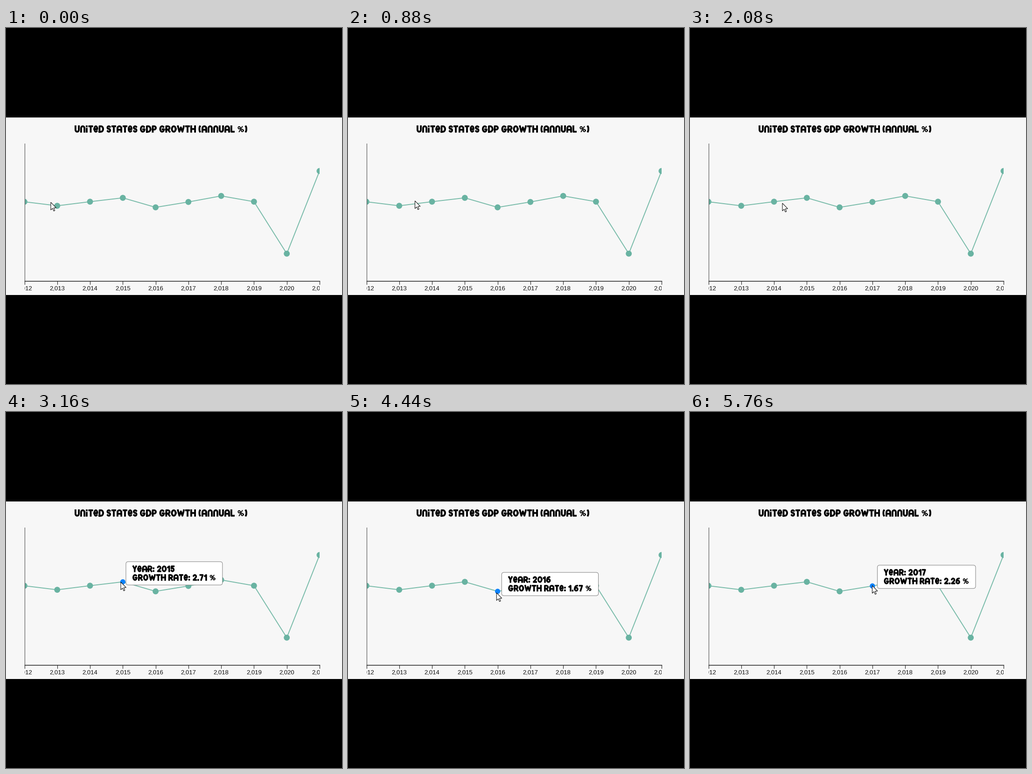
A matplotlib script for the animation above (6.24 s loop, 720x764 px).

```python
import numpy as np
import matplotlib.pyplot as plt
from matplotlib.animation import FuncAnimation
from matplotlib.patches import Circle, FancyBboxPatch, PathPatch, Polygon, Rectangle
from matplotlib.path import Path

W, H, DPI = 720, 764, 100
PX = 72 / DPI
STEP, LOOP = 40, 6240
TEAL, BLUE = "#69b3a2", "#0d82fa"


# ---- Chunky display lettering, built from strokes in a unit box ----
def arc(a0, a1, cx=0.5, cy=0.5, rx=0.5, ry=0.5):
    a = np.radians(np.linspace(a0, a1, 22))
    return list(zip(cx + rx * np.cos(a), cy + ry * np.sin(a)))


def turn(stroke):
    return [(1 - x, 1 - y) for x, y in stroke]


def dot(y):
    return [(0, y), (0, y + 0.02)]


STEM = [(0, 0), (0, 1)]
CUP = [(0, 1)] + arc(180, 360, cy=0.35, ry=0.35) + [(1, 1)]
ARCH = turn(CUP)
BOWL = STEM + arc(90, -90, 0.45, 0.7, 0.55, 0.3) + [(0, 0.4)]
SIX = [(0.85, 1)] + arc(100, 180, 0.6, 0.35, 0.6, 0.62) + arc(180, 540, cy=0.3, ry=0.3)
PAREN = arc(110, 250, cx=1, rx=1)

# character: (advance, strokes)
GLYPHS = {
    "U": (12, [CUP]),
    "N": (12, [ARCH]),
    "I": (5.5, [[(0, 0), (0, 0.55)], dot(0.98)]),
    "T": (11, [[(0, 1), (1, 1)], [(0.5, 0), (0.5, 1)]]),
    "E": (11, [[(0, 0.48), (1, 0.48)] + arc(0, 310)]),
    "D": (12.5, [STEM + arc(90, -90, cx=0.4, rx=0.6) + [(0, 0)]]),
    "S": (10.5, [arc(35, 270, cy=0.76, ry=0.24) + arc(90, -145, cy=0.26, ry=0.26)]),
    "A": (13, [ARCH, [(0, 0.36), (1, 0.36)]]),
    "G": (13, [arc(50, 350) + [(1, 0.45), (0.62, 0.45)]]),
    "P": (11.5, [BOWL]),
    "R": (12, [BOWL, [(0.5, 0.4), (1, 0)]]),
    "O": (13, [arc(0, 360)]),
    "W": (17.5, [[(0, 1), (0.24, 0), (0.5, 0.8), (0.76, 0), (1, 1)]]),
    "H": (13, [STEM, [(1, 0), (1, 1)], [(0, 0.5), (1, 0.5)]]),
    "L": (10, [[(0, 1), (0, 0), (1, 0)]]),
    "Y": (11.5, [[(0, 1), (0.5, 0.45), (1, 1)], [(0.5, 0.45), (0.5, 0)]]),
    "(": (6.5, [PAREN]),
    ")": (6.5, [turn(PAREN)]),
    "%": (16, [[(0.2, 0), (0.8, 0.95)], arc(0, 360, 0.2, 0.73, 0.2, 0.21),
               arc(0, 360, 0.8, 0.22, 0.2, 0.21)]),
    "0": (12.5, [arc(0, 360)]),
    "1": (8, [[(0, 0.78), (1, 1), (1, 0)]]),
    "2": (11, [arc(160, -40, cy=0.7, ry=0.3) + [(0, 0), (1, 0)]]),
    "3": (10.5, [arc(150, -90, cy=0.76, ry=0.24) + arc(90, -150, cy=0.26, ry=0.26)]),
    "4": (11.5, [[(0.75, 0), (0.75, 1), (0, 0.3), (1, 0.3)]]),
    "5": (10.5, [[(1, 1), (0.1, 1), (0.05, 0.55)] + arc(120, -150, cy=0.32, ry=0.32)]),
    "6": (11.5, [SIX]),
    "7": (10.5, [[(0, 1), (1, 1), (0.35, 0)]]),
    "8": (11.5, [arc(0, 360, cy=0.76, rx=0.45, ry=0.24), arc(0, 360, cy=0.26, ry=0.26)]),
    "9": (11.5, [turn(SIX)]),
    ".": (5, [dot(0)]),
    ":": (5.5, [dot(0.05), dot(0.6)]),
}
CAP, WEIGHT, SPACE = 15.5, 3.8, 4.5


def layout(text, x, base, s):
    """Return the heavy path, the light path (percent signs) and the end x."""
    parts = {False: [], True: []}
    for ch in text:
        if ch == " ":
            x += SPACE * s
            continue
        adv, strokes = GLYPHS[ch]
        size = np.array([adv - 1 - WEIGHT, WEIGHT - CAP]) * s
        start = np.array([x + WEIGHT / 2 * s, base - WEIGHT / 2 * s])
        parts[ch == "%"] += [Path(start + np.array(p) * size) for p in strokes]
        x += adv * s
    join = lambda ps: Path.make_compound_path(*ps) if ps else Path(np.zeros((1, 2)))
    return join(parts[False]), join(parts[True]), x


class Lettering:
    def __init__(self, s, z):
        self.s = s
        self.patches = [
            ax.add_patch(PathPatch(Path(np.zeros((1, 2))), fill=False, ec="black", lw=w * s * PX,
                                   capstyle="projecting", joinstyle="round", zorder=z))
            for w in (WEIGHT, 1.9)]

    def put(self, text, x, base):
        heavy, light, end = layout(text, x, base, self.s)
        self.patches[0].set_path(heavy)
        self.patches[1].set_path(light)
        return end

    def show(self, on):
        for p in self.patches:
            p.set_visible(on)


# ---- Stage and chart ----
fig = plt.figure(figsize=(W / DPI, H / DPI), dpi=DPI, facecolor="black")
ax = fig.add_axes([0, 0, 1, 1])
ax.set(xlim=(0, W), ylim=(H, 0))
ax.axis("off")
ax.add_patch(Rectangle((0, 192), W, 381, fc="#f7f7f7", lw=0))
plot = ax.add_patch(Rectangle((39.5, 192), 632.5, 381, fc="none", lw=0))

years = np.arange(2012, 2022)
rates = np.array([2.28, 1.84, 2.29, 2.71, 1.67, 2.26, 2.92, 2.29, -3.4, 5.65])
px = 39.5 + 70.27 * np.arange(10)
py = 364.5 - (rates - 2.71) * 19.6

line, = ax.plot(px, py, color="#78bba9", lw=1.9 * PX, zorder=2)
line.set_clip_path(plot)
dots = []
for x, y in zip(px, py):
    d = ax.add_patch(Circle((x, y), 6.4, fc=TEAL, lw=0, zorder=3))
    d.set_clip_path(plot)
    dots.append(d)

ax.plot([40, 40], [248, 549], color="#444444", lw=1 * PX, zorder=4)
ax.plot([39.5, 672], [542.5, 542.5], color="#111111", lw=1.4 * PX, zorder=4)
for x, year in zip(px, years):
    tx = min(x, 671.5)
    ax.plot([tx, tx], [542.5, 549.5], color="#222222", lw=1.1 * PX, zorder=4)
    label = ax.text(x, 563, f"{year:,}", ha="center", va="baseline", color="#111111",
                    family="Liberation Sans", size=13.1 * PX, clip_on=True)
    label.set_clip_path(plot)

Lettering(1, 5).put("UNITED STATES GDP GROWTH (ANNUAL %)", 147, 224.5)

# ---- Tooltip and pointer ----
tip_box = ax.add_patch(FancyBboxPatch((0, 0), 207, 50, boxstyle="round,pad=0,rounding_size=5",
                                      fc="white", ec="#808080", lw=1 * PX, zorder=6))
tip_lines = [Lettering(0.915, 7), Lettering(0.915, 7)]

ARROW = np.array([(0, 0), (0, 16.5), (3.8, 12.9), (6.3, 18.8), (8.7, 17.7),
                  (6.3, 12), (11.4, 11.8)])
pointer = ax.add_patch(Polygon(ARROW, closed=True, fc="white", ec="black",
                               lw=1 * PX, joinstyle="miter", zorder=9))

# pointer path: time in ms, x, y
MOVES = np.array([
    (0, 96, 374), (320, 107, 379), (560, 107, 379), (880, 143.5, 371), (920, 143.5, 371),
    (1200, 165, 373), (1400, 178, 375), (1640, 184.5, 375), (1920, 184.5, 375),
    (2080, 198, 376), (2560, 226, 366), (2800, 243, 365), (2920, 249.5, 365),
    (3120, 246, 365), (3720, 246, 365), (3880, 252, 371), (4160, 285, 392),
    (4360, 311, 390), (4440, 318.3, 388), (4680, 325, 385), (5080, 325, 385),
    (5280, 363, 397.5), (5440, 377, 400), (5600, 387, 385), (5720, 390.5, 372.5),
])


def draw(i):
    t = i * STEP
    x, y = (np.interp(t, MOVES[:, 0], MOVES[:, k]) for k in (1, 2))
    pointer.set_xy(ARROW + (x, y))

    dist = np.hypot(px - x, py - y)
    near = int(np.argmin(dist))
    hover = bool(dist[near] < 7)
    for k, d in enumerate(dots):
        active = hover and k == near
        d.set_facecolor(BLUE if active else TEAL)
        d.set_radius(5.6 if active else 6.4)

    tip_box.set_visible(hover)
    for row in tip_lines:
        row.show(hover)
    if hover:
        left, top = x + 11, y - 43.8
        tip_lines[0].put(f"YEAR: {years[near]}", left + 14, top + 22.4)
        end = tip_lines[1].put(f"GROWTH RATE: {rates[near]:.2f} %", left + 14, top + 41)
        tip_box.set_bounds(left, top, end + 13.5 - left, 50)
    return []


anim = FuncAnimation(fig, draw, frames=LOOP // STEP, interval=STEP,
                     init_func=lambda: draw(0), repeat=True, repeat_delay=0, blit=False)
plt.show()
```
